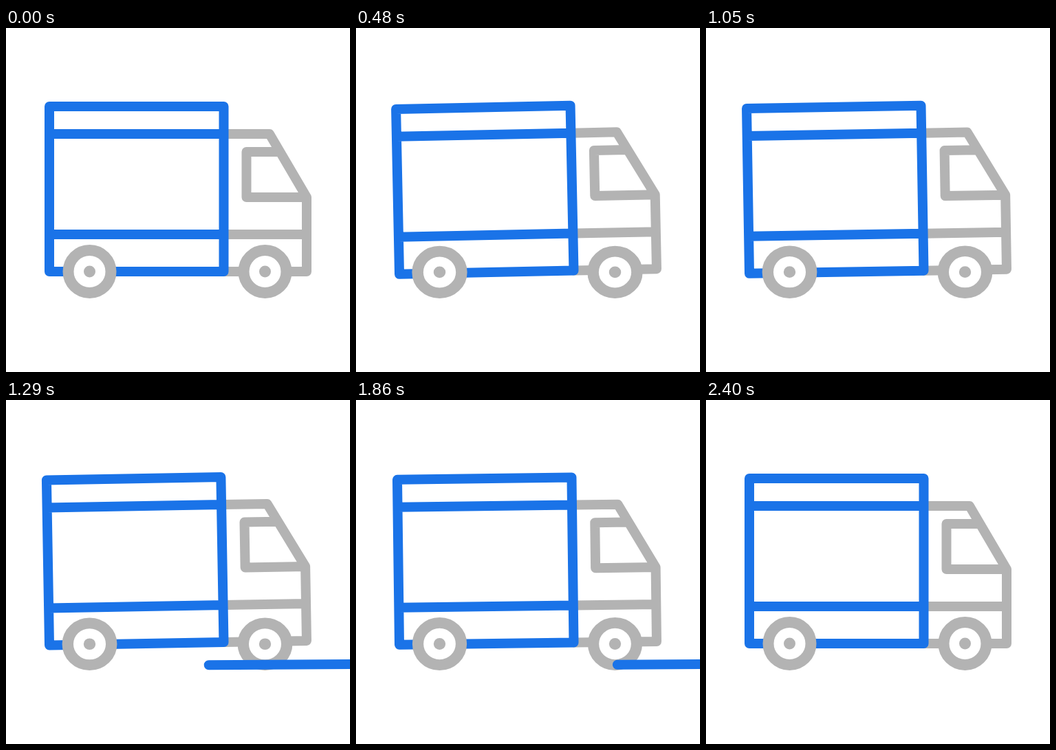
An HTML page for the animation above (2460 ms loop, 500x500 px).

```html
<!DOCTYPE html>
<html lang="en">
<head>
<meta charset="utf-8">
<title>Delivery truck</title>
<style>
  html, body { margin: 0; width: 100%; height: 100%; overflow: hidden; background: #fff; }
  svg { display: block; width: 100%; height: 100%; }
  path, line { fill: none; stroke-width: 14; stroke-linecap: round; stroke-linejoin: round; }
  .gray { stroke: #b3b3b3; }
  .blue { stroke: #1a73e8; }
  .tyre { fill: #fff; stroke: #b3b3b3; stroke-width: 16; }
  .hub { fill: #b3b3b3; }
</style>
</head>
<body>
<svg viewBox="0 0 500 500">
  <defs>
    <g id="wheel">
      <circle class="tyre" r="31"/>
      <circle class="hub" r="8.5"/>
    </g>
  </defs>
  <g id="truck">
    <path class="gray" d="M317 154H383L437 246V354H317M397 180H349.5V246H437M317 300H437"/>
    <path class="blue" d="M63 114H316.5V354H63ZM63 154H316.5M63 300H316.5"/>
  </g>
  <g class="axle"><use href="#wheel"/></g>
  <g class="axle"><use href="#wheel"/></g>
  <line id="road" class="blue"/>
</svg>
<script>
  const LOOP = 2460, STEP = 30, CYCLE = 20, LAST = 80;
  const truck = document.getElementById('truck');
  const road = document.getElementById('road');
  const axles = [...document.querySelectorAll('.axle')];
  const axleX = [121.5, 376.5];

  // [step, value] pairs within one cycle
  const tilt = [[0, 0], [3, -0.98], [5.5, 0.75], [10, -0.66], [13, -0.3], [16, -1.18], [20, 0]];
  const lift = [[0, 0], [3, -0.8], [6, -1], [13, -0.9], [16, 0], [20, 0]];

  function sample(keys, at) {
    const i = Math.max(1, keys.findIndex(k => k[0] >= at));
    const [a, from] = keys[i - 1], [b, to] = keys[i];
    const p = (at - a) / (b - a);
    return from + (to - from) * p * p * (3 - 2 * p);
  }

  function drawRoad(ms) {
    const s = ms - 205;
    const mid = 250 - 1.82 * s - 2e-5 * s ** 3;
    const y = x => 387.1 - 0.0062 * x;
    const x1 = mid - 195, x2 = mid + 193;
    road.setAttribute('x1', x1);
    road.setAttribute('y1', y(x1));
    road.setAttribute('x2', x2);
    road.setAttribute('y2', y(x2));
  }

  function draw(now) {
    const step = Math.min(LAST, Math.floor((now % LOOP) / STEP)) % CYCLE;
    const angle = sample(tilt, step);
    truck.setAttribute('transform', `translate(0 ${sample(lift, step)}) rotate(${angle} 249 354)`);

    // Wheels flatten against the ground as the body leans back
    const squash = Math.max(0, -angle - 0.2) * 0.03;
    axles.forEach((axle, i) => axle.setAttribute('transform',
      `translate(${axleX[i]} ${354 + 39 * squash * 0.8}) scale(${1 + squash} ${1 - squash * 0.8})`));

    drawRoad(step * STEP);
  }

  function tick(now) {
    draw(now);
    requestAnimationFrame(tick);
  }

  draw(0);
  requestAnimationFrame(tick);
</script>
</body>
</html>
```
